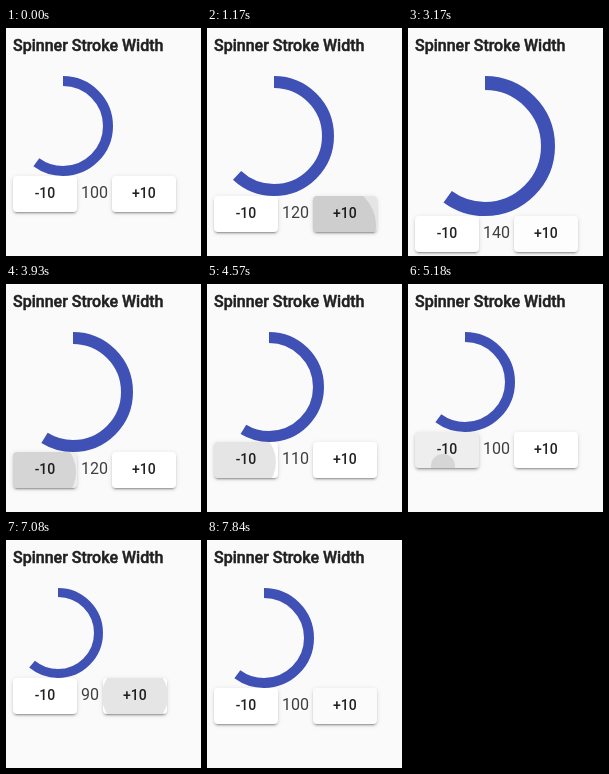
Recreate the animation shown at these times as an HTML page. Size 195x228 px, loop 8.54 s.

```html
<!DOCTYPE html>
<html lang="en">
<head>
<meta charset="utf-8">
<title>Spinner Stroke Width</title>
<style>
  html, body { margin: 0; width: 100%; height: 100%; overflow: hidden; background: #fafafa; }
  body { position: relative; font: 400 16px Roboto, sans-serif; color: rgba(0, 0, 0, .87); }
  h3 {
    position: absolute; left: 7px; top: 8px; margin: 0; white-space: nowrap;
    font: 500 16px/20px Roboto, sans-serif; color: #202020; -webkit-text-stroke: .5px #202020;
  }
  svg { position: absolute; left: 7px; top: 48px; overflow: visible; }
  circle { fill: none; stroke: #3f51b5; }
  .row { position: absolute; left: 7px; white-space: nowrap; }
  .value { color: rgba(0, 0, 0, .75); }
  .button {
    position: relative; display: inline-block; width: 64px; height: 36px;
    border-radius: 4px; background: #fff; text-align: center;
    font: 500 14px/34px Roboto, sans-serif;
  }
  .ink { position: absolute; inset: 0; overflow: hidden; border-radius: 4px; }
  .ink i { position: absolute; border-radius: 50%; background: rgba(0, 0, 0, .1); }
</style>
</head>
<body>
<h3>Spinner Stroke Width</h3>
<svg><circle/></svg>
<div class="row">
  <span class="button">-10<span class="ink"></span></span>
  <span class="value">100</span>
  <span class="button">+10<span class="ink"></span></span>
</div>
<script>
const LOOP = 8540, HOLD = 85, DASH = 225, GROW = 450, FADE = 400, LIFT = 280;
const find = s => document.querySelector(s);
const svg = find('svg'), ring = find('circle'), row = find('.row'), label = find('.value');
const [minus, plus] = document.querySelectorAll('.button');

// Presses made with the pointer resting at one spot of a button.
function tap(button, x, y, ...times) {
  return times.map(press => ({
    button, x, y, press, release: press + HOLD, step: button === plus ? 10 : -10,
    ripple: button.querySelector('.ink').appendChild(document.createElement('i')),
    radius: Math.hypot(Math.max(x, 64 - x), Math.max(y, 36 - y))
  }));
}
const clicks = [
  ...tap(plus, 24, 29, 780, 972, 1300, 2460),
  ...tap(minus, 28, 20, 3440, 3705, 4350),
  ...tap(minus, 28, 34, 4680, 5148, 5760),
  ...tap(plus, 32, 18, 6820, 7190)
];

const clamp = v => Math.min(1, Math.max(0, v));
const mix = (a, b, k) => a + (b - a) * k;

function bezier(x1, y1, x2, y2) {
  const at = (a, b, s) => 3 * a * s * (1 - s) ** 2 + 3 * b * s * s * (1 - s) + s ** 3;
  return x => {
    if (x <= 0) return 0;
    if (x >= 1) return 1;
    let lo = 0, hi = 1;
    for (let i = 0; i < 24; i++) {
      const mid = (lo + hi) / 2;
      if (at(x1, x2, mid) < x) lo = mid; else hi = mid;
    }
    return at(y1, y2, lo);
  };
}
const easeOut = bezier(0, 0, .2, 1), easeInOut = bezier(.4, 0, .2, 1);

const girth = d => Math.PI * d * .9;
const gap = d => girth(d) * .4;

// The dash length jumps at once, its offset follows linearly.
function drawSpinner(t) {
  let size = 100, from = gap(size), since = -DASH;
  const offset = now => mix(from, gap(size), clamp((now - since) / DASH));
  for (const c of clicks) {
    if (c.release > t) break;
    from = offset(c.release);
    since = c.release;
    size += c.step;
  }
  svg.setAttribute('width', size);
  svg.setAttribute('height', size);
  const mid = size / 2;
  const attrs = {
    cx: mid, cy: mid, r: size * .45, 'stroke-width': size / 10,
    'stroke-dasharray': girth(size), 'stroke-dashoffset': offset(t),
    transform: `rotate(-90 ${mid} ${mid})`
  };
  for (const name in attrs) ring.setAttribute(name, attrs[name]);
  row.style.top = 48 + size + 'px';
  label.textContent = size;
}

function drawRipple(c, t) {
  const age = t - c.press, r = c.radius * easeOut(age / GROW);
  Object.assign(c.ripple.style, {
    left: c.x - r + 'px', top: c.y - r + 'px', width: 2 * r + 'px', height: 2 * r + 'px',
    opacity: age < 0 ? 0 : 1 - easeOut((age - GROW) / FADE)
  });
}

function lift(c, t) {
  if (t < c.press) return 0;
  const up = easeInOut((Math.min(t, c.release) - c.press) / LIFT);
  return t < c.release ? up : up * (1 - easeInOut((t - c.release) / (LIFT * up)));
}

// Material elevation 2 rising towards 8.
function shadow(k) {
  const layer = (low, high, alpha) =>
    low.map((v, i) => mix(v, high[i], k) + 'px').join(' ') + ` rgba(0,0,0,${alpha})`;
  return [
    layer([0, 3, 1, -2], [0, 5, 5, -3], .2),
    layer([0, 2, 2, 0], [0, 8, 10, 1], .14),
    layer([0, 1, 5, 0], [0, 3, 14, 2], .12)
  ].join();
}

const start = performance.now();
function frame() {
  const t = (performance.now() - start) % LOOP;
  drawSpinner(t);
  for (const c of clicks) drawRipple(c, t);
  for (const b of [minus, plus]) {
    const own = clicks.filter(c => c.button === b);
    b.style.boxShadow = shadow(Math.max(...own.map(c => lift(c, t))));
  }
  requestAnimationFrame(frame);
}
frame();
</script>
</body>
</html>
```
